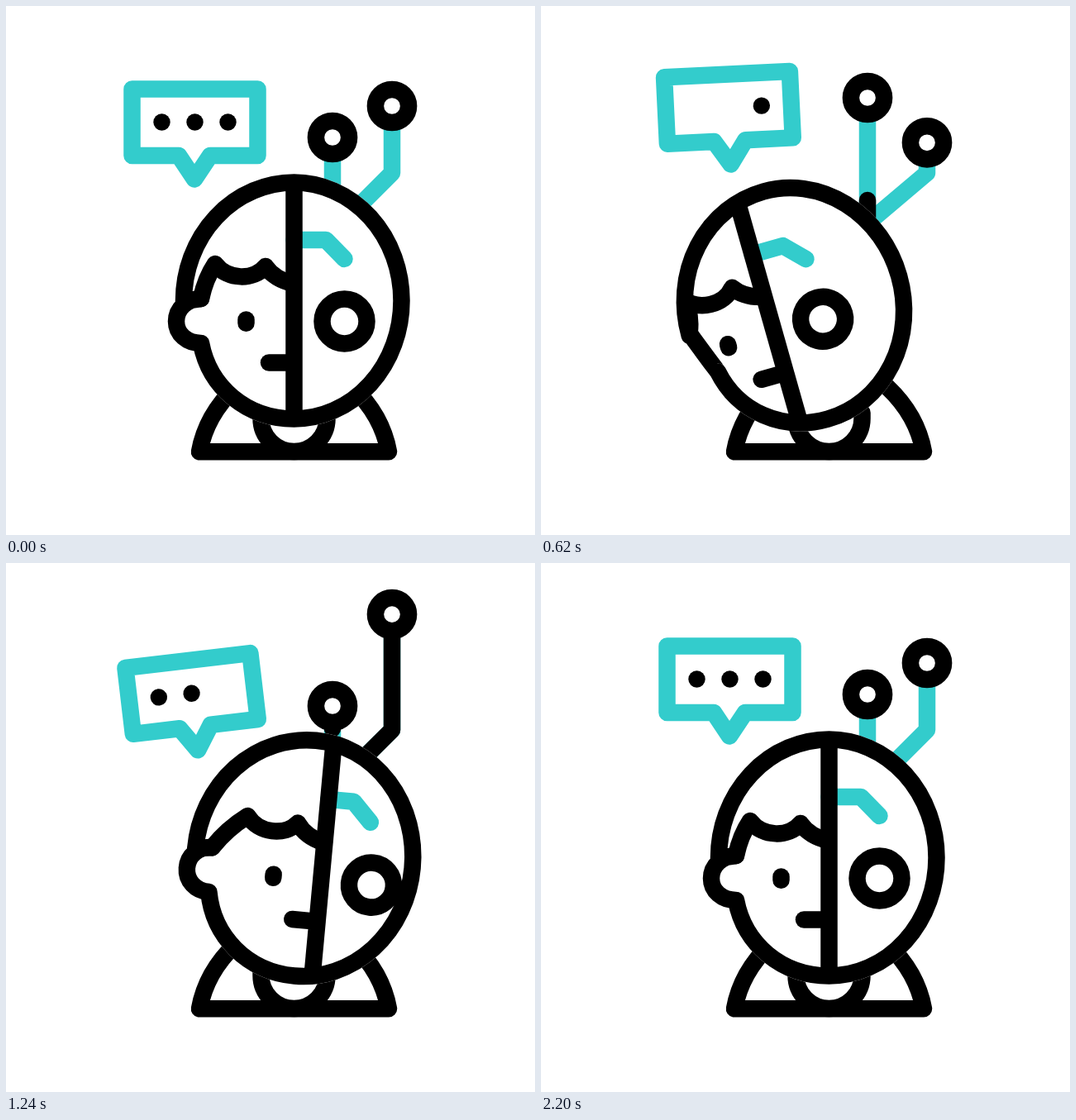
An HTML page with a canvas that plays this animation: 640x640 px, repeating every 2.4 s.

```html
<!DOCTYPE html>
<html lang="en">
<head>
<meta charset="utf-8">
<title>Half human, half robot</title>
<style>
  html, body { margin: 0; width: 100%; height: 100%; overflow: hidden; background: #fff; }
  canvas { display: block; width: 640px; height: 640px; }
</style>
</head>
<body>
<canvas id="stage" width="640" height="640"></canvas>
<script>
const ctx = document.getElementById('stage').getContext('2d');
const LOOP = 2400;
const INK = '#000', TEAL = '#33cccc', PAPER = '#fff';
const LINE = 20.5;
const MID = 348.5;
const MAX_LEFT = 34, MAX_RIGHT = 24.1;

const lerp = (a, b, u) => a + (b - a) * u;

// Eased progress from 0 to 1, beginning at start and lasting span
function move(t, start, span) {
  const u = Math.min(1, Math.max(0, (t - start) / span));
  return u * u * (3 - 2 * u);
}

// How far a part has swung to either side: out, across, and back to rest
function sway(out, across, back) {
  return { left: out - across, right: across - back };
}

function headSway(t) {
  return sway(move(t, 120, 525), move(t, 870, 425), move(t, 1560, 550));
}

function antennaSway(t) {
  return sway(move(t, 0, 600), move(t, 865, 475), move(t, 1590, 610));
}

function stroke(color, path) {
  ctx.strokeStyle = color;
  ctx.stroke(path);
}

function polyline(...points) {
  const path = new Path2D();
  points.forEach(([x, y]) => path.lineTo(x, y));
  return path;
}

function circle(x, y, r) {
  const path = new Path2D();
  path.arc(x, y, r, 0, Math.PI * 2);
  return path;
}

function ring(x, y, r) {
  const path = circle(x, y, r);
  ctx.fillStyle = PAPER;
  ctx.fill(path);
  stroke(INK, path);
}

function rotateAbout(x, y, degrees) {
  ctx.translate(x, y);
  ctx.rotate(degrees * Math.PI / 180);
  ctx.translate(-x, -y);
}

const bubble = new Path2D('M152.5 100.5h152v80.5h-57.5l-19 28.5l-19 -28.5h-56.5z');

function drawBubble(t) {
  const drop = 54 * move(t, 0, 333) - 89.3 * move(t, 333, 400) + 79.3 * move(t, 733, 292)
    - 55 * move(t, 1025, 435) + 11 * move(t, 1460, 360);
  const tilt = -17.3 * move(t, 0, 333) + 31.1 * move(t, 333, 600)
    - 22.1 * move(t, 933, 367) + 8.3 * move(t, 1300, 260);
  ctx.save();
  ctx.translate(0, drop);
  rotateAbout(228.5, 174, tilt);
  stroke(TEAL, bubble);
  ctx.fillStyle = INK;
  for (let i = 0; i < 3; i++) {
    const local = t - 100 * i;
    if (local < 450 || local >= 1100) ctx.fill(circle(188.5 + 40 * i, 140.5, 10.2));
  }
  ctx.restore();
}

// A dark stretch that runs up the stem towards its node
function drawPulse(stem, length, t, start) {
  const lead = move(t, start, 500);
  const tail = move(t, start + 440, 500);
  if (lead <= tail) return;
  ctx.setLineDash([(lead - tail) * length, length * 2]);
  ctx.lineDashOffset = -tail * length;
  stroke(INK, stem);
  ctx.setLineDash([]);
}

function drawAntennas(t, head) {
  const { left, right } = antennaSway(t);
  const bottomA = 262, bendB = 202;
  const rootB = 292 - 14 * head.left;
  const yA = 159 - 48 * left + 22 * right;
  const yB = 121 + 44.3 * left - 72.2 * right;
  const stemA = polyline([395, bottomA], [395, yA]);
  const stemB = polyline([377, rootB], [467, bendB], [467, yB]);
  stroke(TEAL, stemA);
  stroke(TEAL, stemB);
  drawPulse(stemA, bottomA - yA, t, 485);
  drawPulse(stemB, Math.hypot(90, rootB - bendB) + bendB - yB, t, 805);
  ring(395, yA, 20.1);
  ring(467, yB, 20.1);
}

const body = new Path2D('M278 461Q242 495 234 539.3H463Q455 495 419 461');
const collar = new Path2D('M308.5 492V499A40 40 0 0 0 388.5 499V492');

function drawBody() {
  stroke(INK, body);
  stroke(INK, collar);
}

// The ear flattens onto the line from lobe to temple as the head turns away
function headOutline(templeX, openness) {
  const lobeX = 236, lobeY = 408, templeY = 354, midY = 381.5;
  const ear = (depth, y) =>
    [lerp(lobeX, templeX, (lobeY - y) / (lobeY - templeY)) - depth * openness, y];
  const path = new Path2D();
  path.moveTo(215, 357);
  path.ellipse(MID, 356.5, 133.5, 143, 0, Math.PI, Math.PI * 1.5);
  path.ellipse(MID, 356.5, 130, 143, 0, -Math.PI / 2, Math.PI / 2);
  path.bezierCurveTo(291, 499.5, 246, 461, lobeX, lobeY);
  path.bezierCurveTo(...ear(17, lobeY), ...ear(30, 397), ...ear(30, midY));
  path.bezierCurveTo(...ear(30, 366), ...ear(17, templeY), templeX, templeY);
  path.closePath();
  return path;
}

function drawHair(templeX, outline) {
  ctx.save();
  ctx.clip(outline);
  return (shift) => {
    const hair = new Path2D();
    hair.moveTo(templeX, 354);
    hair.quadraticCurveTo(241 + shift * 0.45, 330, 253 + shift, 312);
    hair.bezierCurveTo(268 + shift, 332, 300 + shift, 332, 314 + shift, 315);
    hair.quadraticCurveTo(325 + shift, 331, MID - 0.5 + shift, 336);
    stroke(INK, hair);
    ctx.restore();
  };
}

function drawFace(shift, browShift) {
  const at = (x, y) => [x + shift, y];
  stroke(TEAL, polyline(at(MID, 283), [387 + browShift, 283], [409.5 + browShift, 306]));
  ring(...at(409.5, 381.5), 27);
  stroke(INK, polyline(at(290.5, 379.5), at(290.5, 383.7)));
  stroke(INK, polyline(at(318, 431.5), at(MID - 2, 431.5)));
  ctx.lineCap = 'butt';
  stroke(INK, polyline(at(MID, 216), at(MID, 497)));
  ctx.lineCap = 'round';
}

function drawHead({ left, right }) {
  const shift = MAX_RIGHT * right - MAX_LEFT * left;
  const browShift = 0.65 * MAX_RIGHT * right - MAX_LEFT * left;
  const templeX = 236 - 20.5 * left;
  const outline = headOutline(templeX, 1 - left);
  ctx.save();
  rotateAbout(MID, 505, 6.3 * right - 15.9 * left);
  ctx.fillStyle = PAPER;
  ctx.fill(outline);
  stroke(PAPER, outline);
  drawHair(templeX, outline)(shift);
  drawFace(shift, browShift);
  stroke(INK, outline);
  ctx.restore();
}

function draw(t) {
  ctx.fillStyle = PAPER;
  ctx.fillRect(0, 0, 640, 640);
  ctx.lineWidth = LINE;
  ctx.lineCap = ctx.lineJoin = 'round';
  const head = headSway(t);
  drawBubble(t);
  drawAntennas(t, head);
  drawBody();
  drawHead(head);
}

let begin;
function tick(now) {
  if (begin === undefined) begin = now;
  draw((now - begin) % LOOP);
  requestAnimationFrame(tick);
}
draw(0);
requestAnimationFrame(tick);
</script>
</body>
</html>
```
